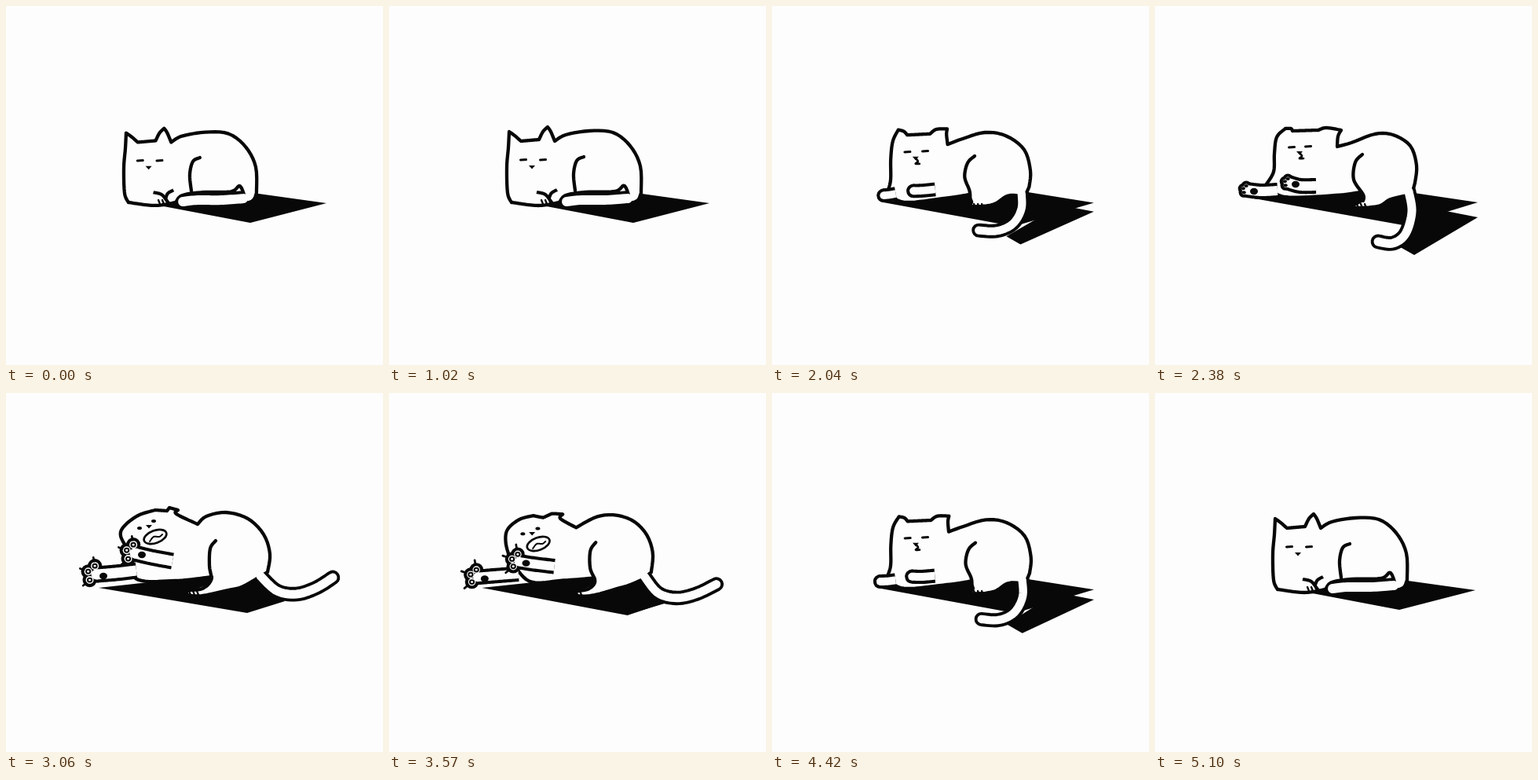
Write an HTML page with a canvas that moves like this. It is 480 by 457 pixels and loops after 5270 ms.

```html
<!DOCTYPE html>
<html lang="en">
<head>
<meta charset="utf-8">
<title>Cat stretching</title>
<style>
html, body { margin: 0; width: 100%; height: 100%; overflow: hidden; background: #fdfdfd; }
canvas { display: block; width: 480px; height: 457px; }
</style>
</head>
<body>
<canvas id="stage"></canvas>
<script>
const INK = '#090808', PAPER = '#fdfdfd', LINE = 4.3, FINE = 2.7;
const STEP = 170, STEPS = 31;

// ---- geometry ----
const points = s => s.trim().split(/\s+/).map(p => p.split(',').map(Number));
const lerp = (a, b, t) => a + (b - a) * t;
const lerpPoints = (a, b, t) => a.map((p, i) => p.map((v, j) => lerp(v, b[i][j], t)));

// Catmull-Rom through the key points
function spline(p, n = 30) {
  const out = [], last = p.length - 1;
  for (let k = 0; k <= n; k++) {
    const u = k / n * last, i = Math.min(Math.floor(u), last - 1), f = u - i;
    const a = p[Math.max(i - 1, 0)], b = p[i], c = p[i + 1], d = p[Math.min(i + 2, last)];
    out.push([0, 1].map(j => b[j] + f / 2 * (c[j] - a[j]
      + f * (2 * a[j] - 5 * b[j] + 4 * c[j] - d[j]
      + f * (3 * (b[j] - c[j]) + d[j] - a[j])))));
  }
  return out;
}
// "|" marks a sharp corner; the next piece goes on from there
function curve(s) {
  let end = [];
  return s.split('|').flatMap(part => {
    const p = [...end, ...points(part)];
    end = p.slice(-1);
    return spline(p);
  });
}

const CURVES = ['body', 'tail', 'haunch', 'armL', 'armR'];
const SPOTS = ['shadow', 'cast', 'eyes', 'nose'];
const SIZES = ['tailWidth', 'armWidth', 'spread'];

function pose(def) {
  const p = { ...def, toes: points(def.toes) };
  for (const k of CURVES) p[k] = curve(def[k]);
  const [, near, far] = points(def.shadow);
  p.cast = [near, near, far, far];
  for (const k of SPOTS) if (def[k]) p[k] = points(def[k]);
  return p;
}
function mix(a, b, t) {
  const p = { ...(t < 0.5 ? a : b) };
  for (const k of [...CURVES, ...SPOTS]) p[k] = lerpPoints(a[k], b[k], t);
  for (const k of SIZES) p[k] = lerp(a[k], b[k], t);
  return p;
}
// Sink towards the ground, as when breathing out
function exhale(a) {
  const p = { ...a };
  for (const k of [...CURVES, 'eyes', 'nose'])
    p[k] = a[k].map(([x, y]) => [lerp(150, x, 0.988), lerp(252, y, 0.982)]);
  return p;
}

// ---- poses ----
// shadow: left, near, far, back, belly
const headUp = `156,250 151,238 150,205 152,180 153,160 | 160,165 168,172 | 191,170
  | 196,160 202,154 | 206,160 211,172`;

const asleep = pose({
  mood: 'sleep', tailWidth: 12, armWidth: -4, spread: 0,
  shadow: '190,253 311,276 408,251 322,239 215,246',
  body: headUp + `| 225,164 255,159 285,161 307,178 320,204 321,238 | 317,247 308,251
    | 300,229 288,236 250,237 225,241 217,250 | 190,254 156,250`,
  tail: '304,245 275,247 245,247 226,249',
  haunch: '248,192 239,197 235,214 237,235',
  armL: '207,250 199,240 188,237', armR: '204,244 207,238 214,234',
  eyes: '171,196 196,196', nose: '182,205', toes: '194,247'
});
const awake = pose({
  mood: 'awake', tailWidth: 9, armWidth: 6, spread: 0,
  shadow: '175,259 296,283 408,251 304,233 215,248',
  body: headUp + `| 230,162 257,158 290,167 315,190 323,220 322,238 | 316,247 311,249
    | 304,235 290,241 284,251 250,255 236,254 233,245 | 208,250 173,260 156,250`,
  tail: '310,243 299,256 270,262 232,264',
  haunch: '249,194 238,203 231,221 233,243',
  armL: '180,252 172,247 160,245', armR: '195,251 202,244 212,240',
  eyes: '170,195 195,194', nose: '181,204', toes: '173,252 192,251 236,247'
});
const reachLow = pose({
  mood: 'purr', tailWidth: 11, armWidth: 12, spread: 5,
  shadow: '115,243 316,279 411,250 330,238 262,236', cast: '300,300 330,317 411,269 340,255',
  body: `141,228 151,211 152,188 155,167 166,156 | 173,156 175,159 | 208,158 | 218,155 237,158 | 233,166 232,179
    | 250,174 280,163 303,164 325,178 333,203 331,225 | 327,240
    | 300,246 284,255 251,256 265,246 262,237 | 230,241 165,243 141,228`,
  tail: '323,236 327,262 319,290 303,302 284,300',
  haunch: '264,189 255,199 253,221 265,240 265,248',
  armL: '117,234 135,236 156,235', armR: '170,225 185,229 205,229',
  eyes: '174,180 195,179', nose: '184,187', toes: '257,252'
});
const yawn = pose({
  mood: 'yawn', tailWidth: 11, armWidth: 13, spread: 11,
  shadow: '118,248 307,280 355,265 318,236 262,232',
  body: `155,199 146,182 150,170 168,156 190,149 | 205,150 | 208,146 | 219,149 | 217,154 244,167
    | 255,157 280,152 308,160 328,180 336,205 333,228 | 318,237
    | 300,247 283,251 250,258 232,257 233,251 258,241 262,234 | 215,239 165,236 155,199`,
  tail: '324,233 345,252 370,256 395,248 416,235',
  haunch: '267,188 260,198 259,220 261,238 250,249 233,251',
  armL: '115,231 140,229 166,226', armR: '164,204 185,209 212,214',
  eyes: '170,172 188,163', nose: '182,170', toes: '233,252'
});
const settle = pose({
  mood: 'purr', tailWidth: 10, armWidth: 8, spread: 5,
  shadow: '118,247 299,289 407,251 333,237 252,236',
  body: `146,234 155,213 153,186 158,174 166,172 | 172,178 | 205,172 | 215,168 230,167 | 225,175 224,183
    | 240,183 257,169 278,159 305,160 325,175 335,200 335,228 | 332,240
    | 295,246 280,257 253,257 267,246 260,239 | 240,238 205,248 146,234`,
  tail: '327,235 333,262 346,279 362,284 387,276',
  haunch: '255,195 248,207 249,228 264,241 267,248 256,255',
  armL: '109,242 130,241 160,241', armR: '170,241 185,240 206,238',
  eyes: '172,196 194,195', nose: '183,201', toes: '257,252'
});
const swing = { ...mix(reachLow, yawn, 0.5), tail: settle.tail };
const reachFar = mix(reachLow, yawn, 1.12);
const slump = exhale(asleep);

const keys = [
  [0, slump], [2, asleep], [4, slump], [6, asleep], [7, awake], [9, awake],
  [14, reachLow], [16, swing], [18, yawn], [20, reachFar], [23, settle],
  [25, reachLow], [28, awake], [29, slump], [30, asleep], [31, slump]
];
const frames = Array.from({ length: STEPS }, (_, n) => {
  const i = keys.findIndex((k, j) => n >= k[0] && n < keys[j + 1][0]);
  const [from, a] = keys[i], [to, b] = keys[i + 1];
  return mix(a, b, (n - from) / (to - from));
});

// ---- drawing ----
const canvas = document.getElementById('stage');
const ctx = canvas.getContext('2d');
const ratio = window.devicePixelRatio || 1;
canvas.width = 480 * ratio;
canvas.height = 457 * ratio;
ctx.scale(ratio, ratio);
ctx.lineJoin = 'round';

function trace(pts) {
  ctx.beginPath();
  pts.forEach(p => ctx.lineTo(...p));
}
function fill(pts, color = INK) {
  trace(pts);
  ctx.fillStyle = color;
  ctx.fill();
}
function stroke(pts, width, color = INK, cap = 'round') {
  if (width <= 0) return;
  trace(pts);
  ctx.lineCap = cap;
  ctx.lineWidth = width;
  ctx.strokeStyle = color;
  ctx.stroke();
}
function oval(x, y, rx, ry = rx, color = INK, turn = 0) {
  ctx.beginPath();
  ctx.ellipse(x, y, Math.max(rx, 0), Math.max(ry, 0), turn, 0, Math.PI * 2);
  ctx.fillStyle = color;
  ctx.fill();
}
function ring(x, y, rx, ry, width, turn = 0) {
  oval(x, y, rx, ry, PAPER, turn);
  ctx.lineWidth = width;
  ctx.strokeStyle = INK;
  ctx.stroke();
}

function drawBody({ body, tail, tailWidth }) {
  stroke(tail, tailWidth + LINE * 1.8);
  fill(body, PAPER);
  stroke(body, LINE);
  stroke(tail, tailWidth, PAPER);
}

function drawArm(arm, width, spread) {
  const [x, y] = arm[0];
  const toes = [1.4, 0.35, -0.7].map(a => [-Math.cos(a), -Math.sin(a)]);
  const at = (d, r) => [x + d[0] * r, y + d[1] * r];
  for (const [grow, color] of [[LINE * 0.95, INK], [0, PAPER]]) {
    stroke(arm, width + grow * 2, color, 'butt');
    oval(x, y, width / 2 + grow, width / 2 + grow, color);
    for (const d of toes) oval(...at(d, spread), Math.min(5, spread / 2) + (spread ? grow : 0), undefined, color);
  }
  if (spread < 4) return;
  oval(x + 9, y + 2, 5, 4.2);
  for (const d of toes) {
    if (spread < 8) oval(...at(d, spread), 2.6, 2);
    else {
      ring(...at(d, spread), 2.6, 2.4, 2);
      stroke([at(d, 17), at(d, 22)], FINE);
    }
  }
}

function drawFace({ eyes, nose: [[x, y]], mood }) {
  if (mood === 'yawn') {
    ring(x + 8, y + 13, 15, 8, FINE, -0.35);
    stroke(spline([[x + 1, y + 19], [x + 6, y + 13], [x + 13, y + 13], [x + 17, y + 10]]), 2);
  }
  if (mood === 'purr') stroke(spline([[x, y], [x + 3, y + 4], [x, y + 7], [x + 5, y + 7]]), FINE);
  if (mood === 'awake') stroke([[x, y], [x + 1, y + 3]], 2);
  fill([[x - 4, y - 2], [x + 4, y - 2], [x, y + 2.5]]);
  for (const [ex, ey] of eyes) {
    if (mood === 'yawn') oval(ex, ey, 3, 2);
    else if (mood === 'awake') {
      ring(ex, ey, 5.5, 3.2, 2.3);
      oval(ex, ey, 1.8, 2.8);
    } else stroke([[ex - 3.5, ey], [ex + 3.5, ey - 0.5]], 3);
  }
}

function drawToes([x, y]) {
  for (let i = 0; i < 3; i++) stroke([[x + i * 5, y], [x + i * 5 + 2, y + 5]], 2.3);
}

function draw(p) {
  ctx.fillStyle = PAPER;
  ctx.fillRect(0, 0, 480, 457);
  fill(p.shadow);
  fill(p.cast);
  drawBody(p);
  stroke(p.haunch, LINE);
  drawArm(p.armL, p.armWidth, p.spread);
  drawArm(p.armR, p.armWidth, p.spread);
  drawFace(p);
  p.toes.forEach(drawToes);
}

let shown = -1;
const start = performance.now();
function tick() {
  const n = Math.floor((performance.now() - start) / STEP) % STEPS;
  if (n !== shown) draw(frames[shown = n]);
  requestAnimationFrame(tick);
}
tick();
</script>
</body>
</html>
```
